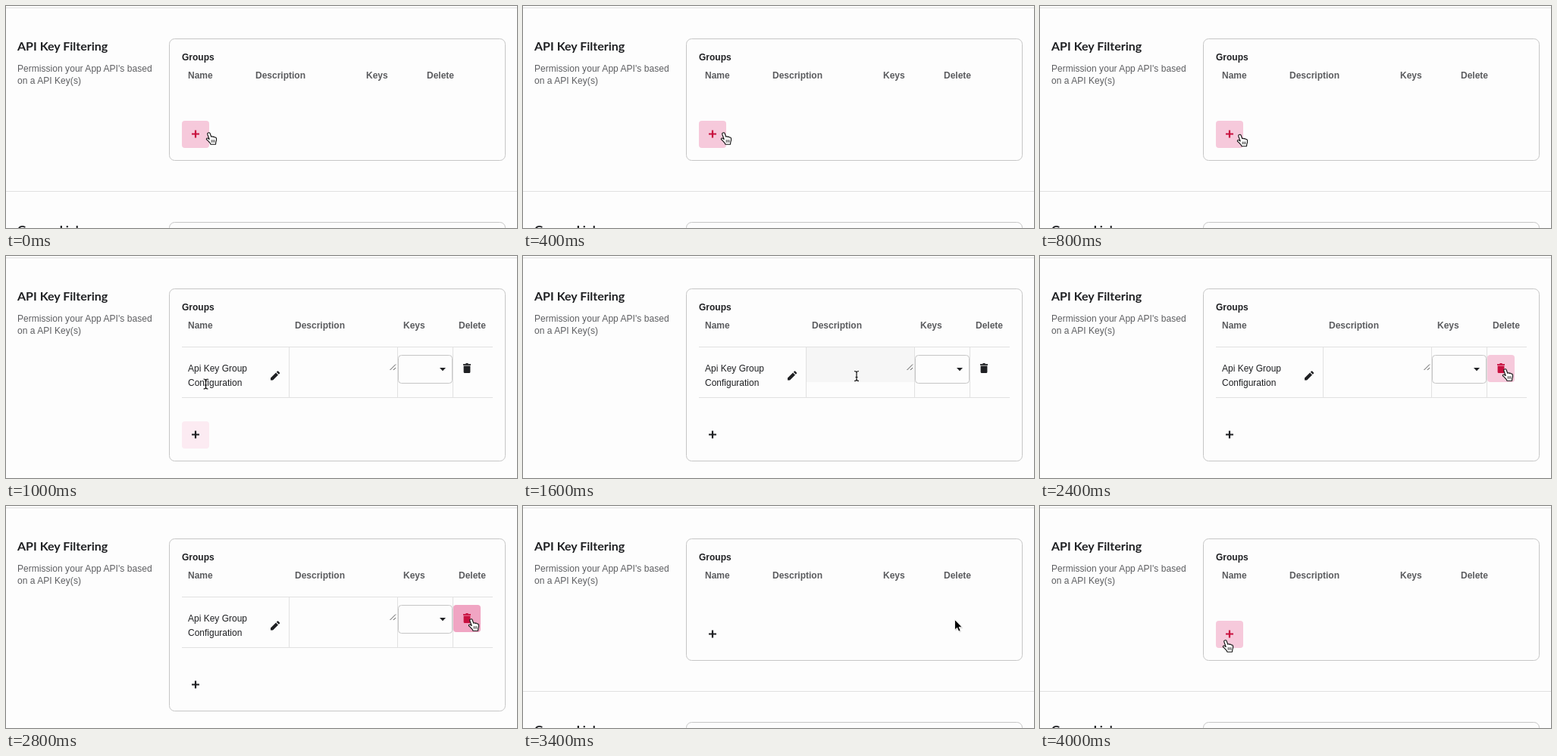
An HTML page that plays this animation: 674 by 294 pixels, repeating every 4200 ms.

```html
<!DOCTYPE html>
<html lang="en">
<head>
<meta charset="utf-8">
<title>API Key Filtering</title>
<style>
  html, body { margin: 0; width: 100%; height: 100%; overflow: hidden; background: #fdfdfd; }
  svg { display: block; width: 674px; height: 294px; }
  text { font: 12px "Liberation Sans", Arial, sans-serif; fill: #1f2023; }
  .title { font: bold 16px Lato, sans-serif; }
  .note { fill: #5d5e61; letter-spacing: .04px; }
  .bold { font-weight: bold; }
  .head { font-weight: bold; fill: #5a5b5e; }
  .rule { stroke: #e1e1e1; fill: none; }
  .frame { stroke: #c6c6c6; fill: none; }
  .icon { fill: #1f2023; }
  .outline { fill: #fff; stroke: #111; stroke-width: 1.1; stroke-linejoin: round; }
</style>
</head>
<body>
<svg viewBox="0 0 674 294">
  <path class="rule" d="M0 2.5H674"/>
  <text class="title" x="15" y="59">API Key Filtering</text>
  <text class="note" x="15" y="87">Permission your App API's based</text>
  <text class="note" x="15" y="103">on a API Key(s)</text>

  <rect id="card" class="frame" x="215.5" y="43.5" width="443" rx="7"/>
  <text class="bold" x="232" y="72">Groups</text>
  <text class="head" x="240" y="96">Name</text>
  <text class="head" id="description" y="96">Description</text>
  <text class="head" id="keys" y="96">Keys</text>
  <text class="head" id="delete" y="96">Delete</text>

  <g id="next">
    <path class="rule" d="M0 245.5H674"/>
    <text class="title" x="15" y="301.5">Groups Links</text>
    <rect class="frame" x="215.5" y="286.5" width="443" height="161" rx="7"/>
  </g>

  <g id="row">
    <rect id="field" x="374" y="121" width="142" height="46" fill="#f6f6f6"/>
    <path class="rule" d="M232 120.5H642M232 187.5H642M373.5 120V187M516.5 120V187M589.5 120V187"/>
    <text x="240" y="153">Api Key Group</text>
    <text x="240" y="172">Configuration</text>
    <path class="icon" d="M349 161.5V164.500H352L359 157.500L356 154.500ZM356.800 153.700L359.800 156.700L361 155.500Q361.500 155 361 154.400L359.100 152.500Q358.500 152 358 152.500Z"/>
    <path d="M506.500 151L514 143.500M511 151L514 148" stroke="#555" fill="none"/>
    <rect class="frame" x="517.5" y="131.500" width="71" height="37" rx="4" style="fill:#fdfdfd"/>
    <path class="icon" d="M572 148H580L576 152.200Z"/>
    <rect id="trashButton" x="590" y="131" width="36" height="36" rx="4"/>
    <path id="trash" d="M603 143H606L606.800 142H609.200L610 143H613V144.700H603ZM603.600 145.600H612.400V153.500Q612.400 155 611 155H605Q603.600 155 603.600 153.500Z"/>
  </g>

  <g id="add">
    <rect id="addButton" x="232" y="152" width="36" height="36" rx="4"/>
    <path id="plus" d="M245 169.500H255M250 164.500V174.500" stroke-width="2.2"/>
  </g>

  <g id="hand">
    <path class="outline" d="M3.100 1C4.200 .300 5.300 .900 5.700 2L7.300 6.300C7.800 5.500 9.300 5.500 9.700 6.500C10.400 5.800 11.700 6.100 12 7.100C13 6.700 13.900 7.300 14 8.300C14.300 10.500 14.200 12 13.300 13.600L13 16.300H6.500L5.800 14.700C4.300 13.300 3.300 11.300 1.300 10C.200 9 1.200 7.600 2.600 8.100L4.700 9.500L2.300 3C2 2.200 2.300 1.400 3.100 1Z"/>
    <path d="M7.700 10.200V13.700M9.600 10.200V13.700M11.500 10.200V13.700" stroke="#111" stroke-width=".8"/>
  </g>
  <g id="arrow">
    <path d="M1 2V15L4 12.500L6 17L8.500 16L6.500 11.500H11Z" fill="#0002"/>
    <path d="M0 0V13.500L3.100 10.700L5.200 15.600L7.600 14.600L5.500 9.900H9.600Z" fill="#000" stroke="#fff" stroke-width=".8"/>
  </g>
  <path id="beam" d="M-3 -6.500Q0 -6.500 0 -4.500Q0 -6.500 3 -6.500M0 -4.500V4.500M-3 6.500Q0 6.500 0 4.500Q0 6.500 3 6.500M-1.500 1.500H1.500" fill="none" stroke="#111" stroke-width="1.2"/>
</svg>
<script>
const STEP = 200, STEPS = 21;
const el = id => document.getElementById(id);

// Pointer changes: step, shape, x, y
const pointer = [
  [0, "hand", 263.5, 167], [1, "hand", 260.5, 167], [3, "hand", 257.5, 168],
  [4, "hand", 259.5, 169.500], [5, "beam", 263.5, 169.500], [8, "beam", 440, 159],
  [9, "hand", 622, 149], [10, "arrow", 636.500, 147], [11, "hand", 620.500, 150],
  [12, "hand", 609.500, 149], [16, "arrow", 613, 151], [17, "arrow", 569.500, 150.500],
  [18, "arrow", 402, 155], [19, "arrow", 269, 178], [20, "hand", 240.500, 177]
];
const addStates = [[0, "hover"], [1, "press"], [2, "hover"], [5, "fade"], [6, "idle"], [20, "hover"]];
const trashStates = [[0, "idle"], [9, "fade"], [10, "idle"], [11, "fade"], [12, "hover"], [14, "press"]];
const buttonColors = {
  idle: ["none", "#1f2023"],
  fade: ["#fcebf2", "#1f2023"],
  hover: ["#f6c9db", "#c8103f"],
  press: ["#f0a5c3", "#c8103f"]
};

const latest = (list, step) => list.filter(entry => entry[0] <= step).pop();
const show = (id, on) => el(id).style.display = on ? "" : "none";
const move = (id, x, y) => el(id).setAttribute("transform", `translate(${x} ${y})`);

function paintButton(box, icon, paint, states, step) {
  const [background, ink] = buttonColors[latest(states, step)[1]];
  el(box).setAttribute("fill", background);
  el(icon).setAttribute(paint, ink);
}

function render(step) {
  const open = step >= 5 && step < 15;
  const shift = open ? 67 : 0;
  el("card").setAttribute("height", 161 + shift);
  el("description").setAttribute("x", open ? 381 : 329);
  el("keys").setAttribute("x", open ? 524 : 475);
  el("delete").setAttribute("x", open ? 597 : 555);
  move("add", 0, shift);
  move("next", 0, shift);
  show("row", open);
  show("field", step === 8);
  paintButton("addButton", "plus", "stroke", addStates, step);
  paintButton("trashButton", "trash", "fill", trashStates, step);

  const [, shape, x, y] = latest(pointer, step);
  for (const id of ["hand", "arrow", "beam"]) show(id, id === shape);
  move(shape, x, y);
}

const start = performance.now();
function tick() {
  render(Math.floor((performance.now() - start) / STEP) % STEPS);
  requestAnimationFrame(tick);
}
tick();
</script>
</body>
</html>
```
